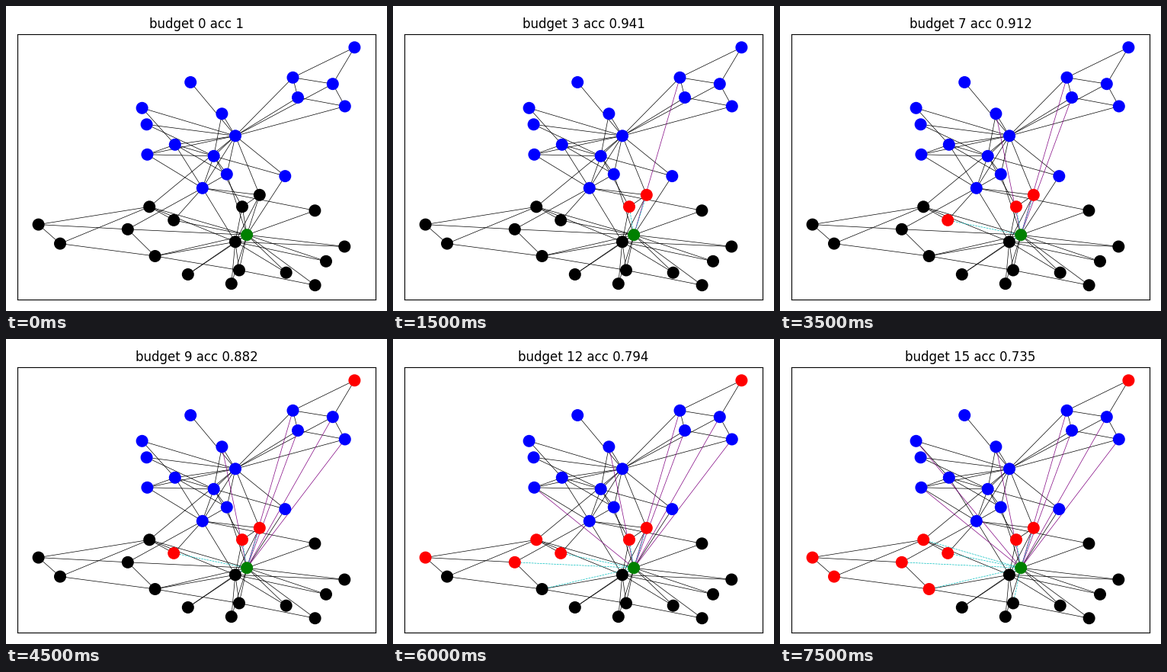
Animation of 500 by 400 pixels, one loop 8000 ms. Source, as a matplotlib script:

```python
import matplotlib.pyplot as plt
from matplotlib.animation import FuncAnimation
from matplotlib.collections import LineCollection

W, H, DPI = 500, 400, 100
HUB = 33

# Node positions in pixels, measured from the top left corner
POS = [
    (301, 170.3), (272.7, 196.8), (257.8, 238.8), (221.8, 181.8),
    (383, 120), (428.8, 102.2), (376.5, 93.8), (185.4, 194.8),
    (332.8, 247.8), (405.4, 268.3), (444.8, 131.5), (242.2, 100),
    (178.6, 133.8), (289.8, 220.6), (238.8, 352), (295.8, 364.2),
    (457.4, 54.3), (283.4, 141.3), (367.7, 349.7), (366.3, 223.1),
    (420, 334.8), (184.6, 155.3), (444.3, 315.5), (195.6, 328),
    (42.6, 286.6), (71, 311.6), (405.6, 366.2), (159.8, 292.8),
    (220.2, 280.9), (306, 346.5), (310, 263.2), (188.2, 263.3),
    (300.9, 309.3), (316.1, 300.2),
]

# Each node with its higher-numbered neighbours
LINKS = {
    0: [1, 2, 3, 4, 5, 6, 7, 8, 10, 11, 12, 13, 17, 19, 21, 31],
    1: [2, 3, 7, 13, 17, 19, 21, 30],
    2: [3, 7, 8, 9, 13, 27, 28, 32],
    3: [7, 12, 13],
    4: [6, 10],
    5: [6, 10, 16],
    6: [16],
    8: [30, 32, 33],
    9: [33], 13: [33], 19: [33],
    14: [32, 33], 15: [32, 33], 18: [32, 33], 20: [32, 33], 22: [32, 33],
    23: [25, 27, 29, 32, 33],
    24: [25, 27, 31],
    25: [31],
    26: [29, 33],
    27: [33],
    28: [31, 33],
    29: [32, 33],
    30: [32, 33],
    31: [32, 33],
    32: [33],
}
EDGES = [(a, b) for a, near in LINKS.items() for b in near]
BLUE = set(range(8)) | {10, 11, 12, 13, 16, 17, 19, 21}

# One edge to the hub is flipped per step
FLIPS = [8, 6, 30, 28, 17, 32, 4, 5, 10, 27, 23, 7, 12, 29, 31]

# Misclassified nodes that enter or leave the set at a step
TOGGLES = {
    1: {8}, 3: {30}, 4: {28}, 9: {16}, 10: {4, 10},
    11: {4, 10, 27, 31}, 12: {24}, 13: {25}, 14: {16, 23}, 15: {16},
}


def wrong_at(step):
    wrong = set()
    for k in range(1, step + 1):
        wrong ^= TOGGLES.get(k, set())
    return wrong


def node_color(n, wrong):
    if n == HUB:
        return "green"
    if n in wrong:
        return "red"
    return "blue" if n in BLUE else "black"


def segments(edges):
    return [(POS[a], POS[b]) for a, b in edges]


fig, ax = plt.subplots(figsize=(W / DPI, H / DPI), dpi=DPI)
title = ax.set_title("budget 0 acc 1", fontsize=12)
ax.set_xticks([])
ax.set_yticks([])
fig.tight_layout()

# Make data coordinates equal to stage pixels
box = ax.bbox
ax.set_xlim(box.x0, box.x1)
ax.set_ylim(H - box.y0, H - box.y1)


def add_lines(color, style="solid"):
    lines = LineCollection([], colors=color, linewidths=0.5,
                           linestyles=style, zorder=1)
    return ax.add_collection(lines, autolim=False)


kept = add_lines("black")
added = add_lines("purple")
removed = add_lines("c", "dashed")
nodes = ax.scatter(*zip(*POS), s=100, linewidths=1.5, zorder=2)


def update(step):
    flipped = {(n, HUB) for n in FLIPS[:step]}
    kept.set_segments(segments(e for e in EDGES if e not in flipped))
    added.set_segments(segments(sorted(flipped - set(EDGES))))
    removed.set_segments(segments(sorted(flipped & set(EDGES))))

    wrong = wrong_at(step)
    colors = [node_color(n, wrong) for n in range(len(POS))]
    nodes.set_facecolor(colors)
    nodes.set_edgecolor(colors)
    acc = 1 - len(wrong) / len(POS)
    title.set_text(f"budget {step} acc {acc:.3g}")
    return kept, added, removed, nodes, title


anim = FuncAnimation(fig, update, frames=len(FLIPS) + 1, interval=500,
                     repeat=True, repeat_delay=0)
plt.show()
```
